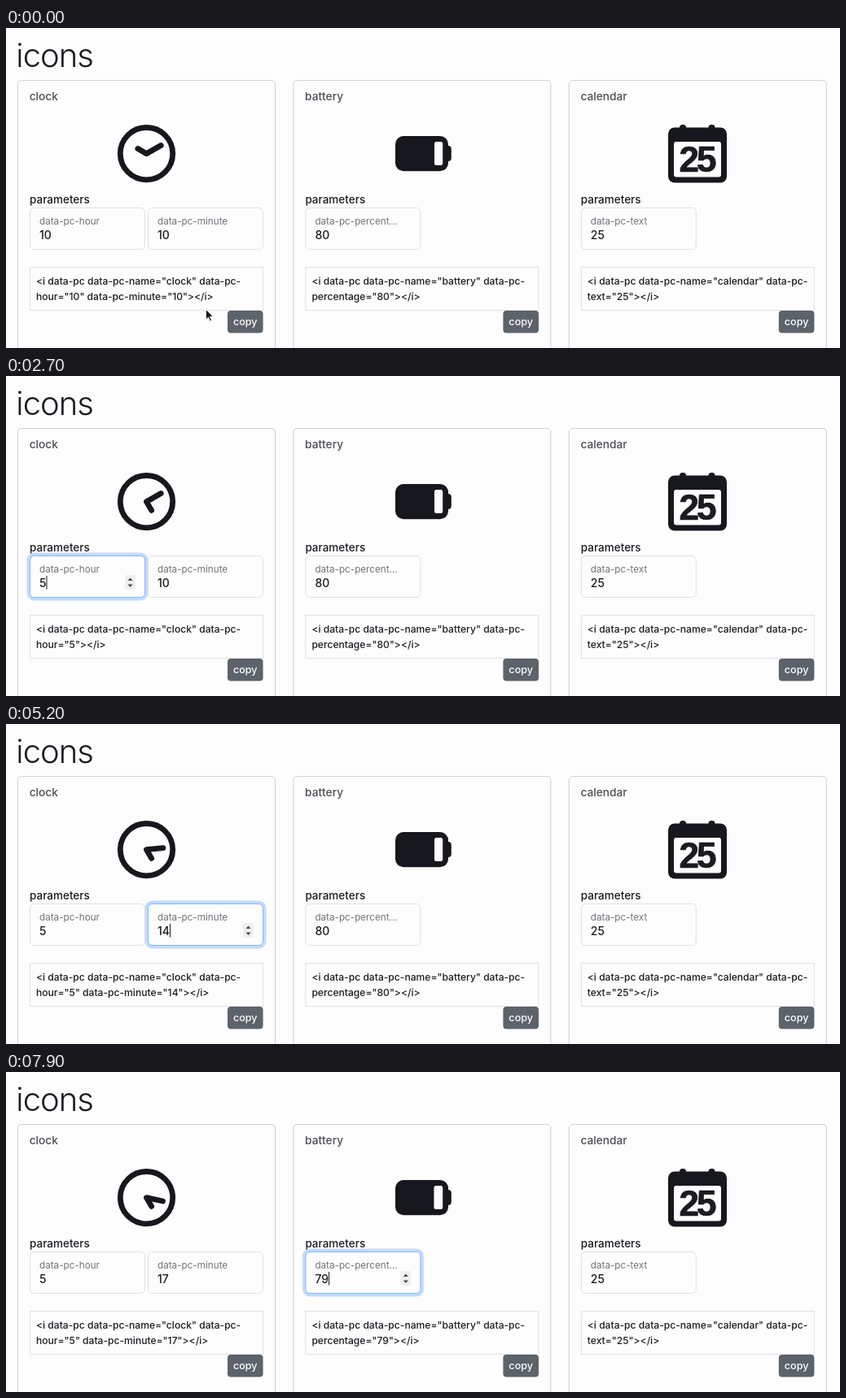
An HTML page that plays this animation: 1024 px wide and 394 px high, repeating every 8 s.

```html
<!DOCTYPE html>
<html lang="en">
<head>
<meta charset="utf-8">
<title>icons</title>
<style>
  html, body { margin: 0; width: 100%; height: 100%; overflow: hidden; background: #fdfdfd; }
  svg { display: block; width: 1024px; height: 394px; }
  text { font-family: Inter, "Open Sans", sans-serif; fill: #1b1c22; white-space: pre; }
  .h1 { font-size: 40px; font-weight: 300; letter-spacing: -1px; }
  .title { font-size: 13.7px; font-weight: 500; fill: #4c4d55; }
  .head { font-size: 13.5px; font-weight: 450; }
  .label { font-size: 11.7px; fill: #71737a; }
  .value { font-size: 14px; font-weight: 450; }
  .code { font-size: 12.1px; font-weight: 450; }
  .copy { font-size: 12.6px; font-weight: 450; fill: #fdfdfd; text-anchor: middle; }
  .day { font: bold 44px "Liberation Sans", Arial, sans-serif; letter-spacing: -3px; stroke: #17181d; stroke-width: .7; }
  .card { fill: none; stroke: #d0d0d6; }
  .box { fill: none; stroke: #dfe0e8; }
  .ink { fill: #17181d; }
  .line { fill: none; stroke: #17181d; stroke-width: 6.8; stroke-linecap: round; stroke-linejoin: round; }
  .paper { fill: #fdfdfd; }
</style>
</head>
<body>
<svg id="stage" viewBox="0 0 1024 394"></svg>
<script>
const LOOP = 8000, STEP = 100;
const stage = document.getElementById('stage');

function add(tag, attrs, content = '', parent = stage) {
  const el = document.createElementNS('http://www.w3.org/2000/svg', tag);
  for (const k in attrs) el.setAttribute(k, attrs[k]);
  el.textContent = content;
  return parent.appendChild(el);
}
const label = (x, y, cls, s) => add('text', { x, y, class: cls }, s);
const rect = (x, y, width, height, rx, cls) => add('rect', { x, y, width, height, rx, class: cls });
const show = (el, on) => el.setAttribute('visibility', on ? 'visible' : 'hidden');
const setText = (el, s) => { if (el.textContent !== s) el.textContent = s; };

function card(x, name, code) {
  rect(x + .5, 64.5, 316, 360, 4.5, 'card');
  label(x + 14.7, 89, 'title', name);
  label(x + 15, 215.5, 'head', 'parameters');
  rect(x + 15.5, 294.5, 286, 53, 0, 'box');
  label(x + 23, 316, 'code', `<i data-pc data-pc-name="${name}" data-pc-`);
  rect(x + 258, 348, 43.6, 27.5, 4, '').setAttribute('fill', '#5c636a');
  label(x + 279.8, 366, 'copy', 'copy');
  return label(x + 23, 334.5, 'code', code);
}

function field(x, name, value) {
  rect(x + .5, 221.5, 141, 51, 5, 'box');
  const ring = add('g', { fill: 'none' });
  add('rect', { x: x - 1.5, y: 219.5, width: 145, height: 55, rx: 7, stroke: '#c2dbfe', 'stroke-width': 4 }, '', ring);
  add('rect', { x: x + .5, y: 221.5, width: 141, height: 51, rx: 5, stroke: '#86b7fe' }, '', ring);
  label(x + 12, 242, 'label', name);
  const text = label(x + 12, 259.5, 'value', value);
  const spin = add('g', { transform: `translate(${x + 117} 245)` });
  add('rect', { width: 13, height: 18, rx: 3, fill: '#efefef' }, '', spin);
  add('path', { d: 'M3.5 7L6.5 3.5L9.5 7ZM3.5 11.5L6.5 15L9.5 11.5Z', fill: '#46474c' }, '', spin);
  const caret = add('rect', { y: 246, width: 1, height: 16.5, class: 'ink' });
  for (const el of [ring, spin, caret]) show(el, false);
  return { x, ring, text, spin, caret };
}

label(12.3, 47.5, 'h1', 'icons');
const clockCode = card(14, 'clock', '');
const batteryCode = card(352.4, 'battery', '');
card(690.8, 'calendar', 'text="25"></i>');

// clock
add('circle', { cx: 172.5, cy: 154.7, r: 32.2, class: 'line' });
const hands = add('path', { class: 'line' });

// battery
rect(478, 133, 65, 43.2, 10, 'ink');
rect(538, 145, 8.8, 19, 4, 'ink');
const empty = rect(526, 140, 10, 29, 2.5, 'paper');

// calendar
rect(813, 122.5, 72, 68, 8, 'ink');
rect(827, 119, 8, 10, 3.5, 'ink');
rect(862.5, 119, 8, 10, 3.5, 'ink');
rect(820, 140, 58, 43.5, 3, 'paper');
label(826.5, 177, 'day', '25');

// Each field gains focus at "from" and loses it at "to"; "keys" are the step times.
const fields = [
  { ...field(29, 'data-pc-hour', '10'), start: 10, dir: -1, from: 850, to: 3450, keys: [1800, 2000, 2200, 2400, 2600] },
  { ...field(174, 'data-pc-minute', '10'), start: 10, dir: 1, from: 3450, to: 6800, keys: [4500, 4700, 4900, 5100, 5300, 5500, 5700] },
  { ...field(367.4, 'data-pc-percent...', '80'), start: 80, dir: -1, from: 6800, to: LOOP + 200, keys: [7700] },
];
field(705.8, 'data-pc-text', '25');

const arrow = add('path', {
  d: 'M0 0V12.5L2.9 9.8L4.9 14.4L7 13.5L5 9H9Z', class: 'ink', stroke: '#fdfdfd', 'stroke-width': .9,
});
const beam = add('path', {
  d: 'M-3 -7Q0 -7 0 -5Q0 -7 3 -7M0 -5V5M-3 7Q0 7 0 5Q0 7 3 7M-1.5 2H1.5',
  fill: 'none', stroke: '#17181d', 'stroke-width': 1.2,
});

// Pointer moves: start, end, and the two end points.
const moves = [
  [0, 800, 245.5, 346.5, 140, 251],
  [3100, 3500, 140, 251, 231.5, 254],
  [5900, 6700, 231.5, 254, 420, 252],
];
const clamp = v => Math.max(0, Math.min(1, v));
const ease = v => v * v * (3 - 2 * v);

function pointer(t) {
  const [a, b, x0, y0, x1, y1] = moves.filter(m => t >= m[0]).pop();
  const k = ease(clamp((t - a) / (b - a)));
  return [x0 + (x1 - x0) * k, y0 + (y1 - y0) * k];
}

function hand(angle, length) {
  const a = angle * Math.PI / 180;
  return `${172.5 + length * Math.sin(a)} ${154.7 - length * Math.cos(a)}`;
}

function draw(t) {
  const [px, py] = pointer(t);
  const typing = fields.some((f, i) => t >= f.keys[0] && t < (moves[i + 1] || [LOOP])[0]);
  const inField = py > 222 && py < 272 && fields.some(f => px > f.x && px < f.x + 141);
  const inCode = py > 298 && py < 342 && px > 35 && px < 308;
  show(arrow, !typing && !inField && !inCode);
  show(beam, !typing && (inField || inCode));
  for (const c of [arrow, beam]) c.setAttribute('transform', `translate(${px} ${py})`);

  const [hour, minute, charge] = fields.map(f => {
    const pressed = f.keys.filter(k => k <= t);
    const value = f.start + f.dir * pressed.length;
    const focused = t >= f.from && t < f.to;
    const hovered = inField && !typing && px > f.x && px < f.x + 141;
    const glow = ease(clamp((t - f.from) / 150)) * (1 - ease(clamp((t - f.to) / 150)));
    const since = t - (pressed.pop() ?? f.from);
    setText(f.text, String(value));
    show(f.ring, glow > 0);
    f.ring.setAttribute('opacity', glow);
    show(f.spin, focused || hovered);
    show(f.caret, focused && since % 1000 < 500);
    f.caret.setAttribute('x', f.x + 12 + f.text.getComputedTextLength());
    return value;
  });

  const minutePart = hour === minute || minute !== 10 ? ` data-pc-minute="${minute}"` : '';
  setText(clockCode, `hour="${hour}"${minutePart}></i>`);
  setText(batteryCode, `percentage="${charge}"></i>`);
  hands.setAttribute('d', `M${hand(hour * 30, 12.3)}L172.5 154.7L${hand(minute * 6, 20.5)}`);
  const edge = 485 + 51.2 * charge / 100;
  empty.setAttribute('x', edge);
  empty.setAttribute('width', 536.2 - edge);
}

function tick() {
  const t = performance.now() % LOOP;
  draw(Math.floor(t / STEP) * STEP);
  requestAnimationFrame(tick);
}
tick();
</script>
</body>
</html>
```
